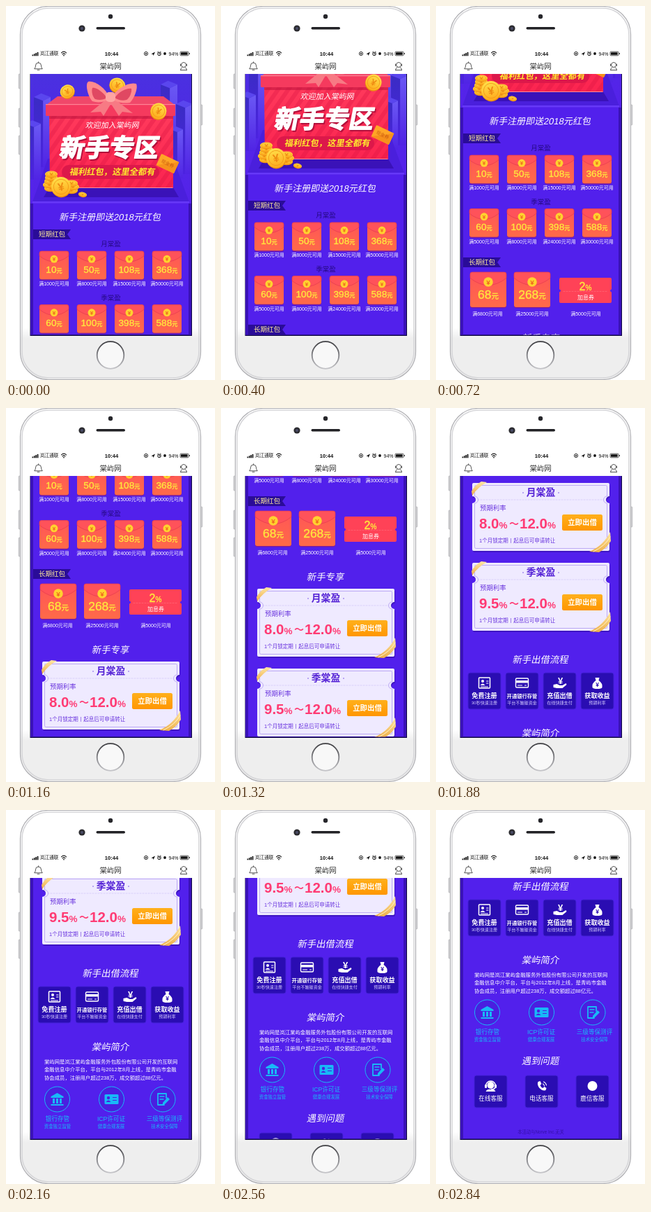
An HTML page for the animation above (3 s loop, 300 px wide and 534 px high).

```html
<!DOCTYPE html>
<html lang="zh">
<head>
<meta charset="utf-8">
<style>
html, body { margin: 0; width: 100%; height: 100%; overflow: hidden; background: #fff; }
svg { display: block; width: 100%; height: 100%; }
text { font-family: "Liberation Sans", "Noto Sans CJK SC", "Noto Sans CJK", sans-serif; }
</style>
</head>
<body>
<svg id="stage" viewBox="0 0 300 534" xmlns="http://www.w3.org/2000/svg"></svg>
<script>
const LOOP = 3000, TICK = 40;
// begin, end, scroll from, scroll to, start slope, end slope
const MOVES = [
  [240, 720, 0, 137, .5, .5],
  [960, 1520, 137, 449, 1, .3],
  [1720, 2320, 449, 680, 1, .15],
  [2520, 2840, 680, 771, .6, .4]
];

const rect = (x, y, w, h, fill, r = 0, more = '') =>
  `<rect x="${x}" y="${y}" width="${w}" height="${h}" rx="${r}" fill="${fill}" ${more}/>`;
const circle = (x, y, r, fill, more = '') =>
  `<circle cx="${x}" cy="${y}" r="${r}" fill="${fill}" ${more}/>`;
const path = (d, fill, more = '') => `<path d="${d}" fill="${fill}" ${more}/>`;
const line = (d, color, w = 1, more = '') =>
  path(d, 'none', `stroke="${color}" stroke-width="${w}" stroke-linecap="round" stroke-linejoin="round" ${more}`);
const at = (x, y, body, more = '') => `<g transform="translate(${x} ${y}) ${more}">${body}</g>`;
// y is the middle of the line of text
const text = (x, y, s, size, fill = '#fff', more = '') =>
  `<text x="${x}" y="${y + size * .36}" font-size="${size}" fill="${fill}" text-anchor="middle" ${more}>${s}</text>`;
const left = (x, y, s, size, fill, more = '') =>
  text(x, y, s, size, fill, more).replace('"middle"', '"start"');
const slant = (x, y, s, size, fill, more = '') => at(x, y, text(0, 0, s, size, fill, more), 'skewX(-11)');
const BOLD = 'font-weight="700"';
const heavy = (color, w) => `font-weight="900" stroke="${color}" stroke-width="${w}" stroke-linejoin="round"`;

const grad = (id, a, b, from = 0, to = 1) =>
  `<linearGradient id="${id}" x2="0" y2="1"><stop offset="${from}" stop-color="${a}"/><stop offset="${to}" stop-color="${b}"/></linearGradient>`;

const defs = `<defs>
  ${grad('sky', '#4a30e0', '#5522ea')}${grad('bright', '#6a58f4', '#5024e4')}${grad('shade', '#3a2cc4', '#4c22e0')}
  ${grad('box', '#ff3a5c', '#fb2450')}${grad('envelope', '#ff5558', '#ff6a48')}${grad('gold', '#ffe04a', '#ffa91c')}
  ${grad('button', '#ffb01c', '#ff9600')}${grad('strip', '#ffe6a4', '#eeb04a')}${grad('shell', '#fff', '#eee', .86, .89)}
  ${grad('ring', '#3c3c40', '#c4c4c8')}
  <pattern id="stripes" width="12" height="12" patternUnits="userSpaceOnUse" patternTransform="rotate(35)">${rect(0, 0, 6, 12, '#d8123f', 0, 'opacity=".3"')}</pattern>
  <clipPath id="view">${rect(35, 97, 231, 372.5, '#000')}</clipPath>
</defs>`;

const yen = (x, y, r, turn = 0, squash = 1) => at(x, y,
  circle(0, 1.4, r, '#e88a10') + circle(0, 0, r, 'url(#gold)') +
  circle(0, 0, r * .76, 'none', 'stroke="#f39a18" stroke-width=".8"') +
  text(0, 0, '¥', r * 1.15, '#ee8a12', BOLD), `rotate(${turn}) scale(1 ${squash})`);

// block seen from a corner: two faces and a flat roof
const tower = (x, y, w, h) => {
  const m = x + w * .55, d = w * .22;
  return path(`M${x} ${y}L${m} ${y + d}V${y + h}H${x}Z`, 'url(#shade)') +
    path(`M${m} ${y + d}L${x + w} ${y}V${y + h}H${m}Z`, 'url(#bright)') +
    path(`M${x} ${y}L${m - d / 2} ${y - d}L${x + w} ${y}L${m} ${y + d}Z`, '#5a46ee');
};

function hero() {
  let s = rect(35, 97, 231, 185, 'url(#sky)');
  s += tower(40, 130, 24, 100) + tower(28, 168, 22, 80) +
    tower(222, 112, 24, 120) + tower(244, 140, 24, 100) + tower(236, 176, 18, 70);
  // platform
  s += path('M60 218H240L263 280H38Z', '#4a1fdc') + path('M64 256H238L248 273H54Z', '#3a12b8') +
    rect(38, 279, 225, 2.5, '#6638f8');
  // box and lid
  s += path('M62 152H240V260H63Z', 'url(#box)') + path('M62 152H240V260H63Z', 'url(#stripes)') +
    rect(62, 156, 178, 5, '#c01440', 0, 'opacity=".6"') +
    path('M74 129H226L242 141H58Z', '#f0486a') + rect(57, 140, 186, 17, '#f53a5e', 1.5) +
    rect(57, 140, 186, 1.2, '#ff8496') + line('M64 259.5H239', '#ff8a98', 1);
  s += yen(88, 122, 10.5, -25, .9) + yen(160, 113, 11.5, 20, .9);
  // bow
  s += path('M148 130L121 152L136 151L140 157L154 134Z', '#f77a84') + path('M152 130L182 153L167 151L162 157L147 134Z', '#f77a84') +
    path('M149 131C142 116 127 106 118 108C113 112 118 130 124 136C133 139 144 137 149 131Z', '#ff8a8e') +
    path('M151 131C159 118 176 108 187 111C190 117 184 132 178 138C167 140 156 137 151 131Z', '#ff8a8e') +
    path('M145 131C137 121 129 116 124 117C122 122 125 131 128 133C134 135 140 134 145 131Z', '#e04862') +
    path('M156 131C163 122 173 117 180 118C181 123 177 132 173 134C167 136 161 134 156 131Z', '#e04862') +
    rect(143, 123, 14, 14, '#ffa5a2', 5);
  s += yen(219, 150, 11.5, 25);
  s += slant(153, 170.5, '欢迎加入棠屿网', 11, '#fff') + rect(80, 227, 140, 20, '#dc184a', 10);
  s += slant(150.5, 204.5, '新手专区', 35.5, '#b3103c', heavy('#b3103c', 1.6)) +
    slant(149, 202, '新手专区', 35.5, '#fff', heavy('#fff', 1.6));
  s += slant(153, 237, '福利红包，这里全都有', 12.3, '#ffe92e', BOLD);
  s += at(232, 225, rect(-14, -9, 28, 18, '#ffa526', 1.5) + path('M-14 9L14 -9V9Z', '#f7901c') +
    text(0, 0, '现金券', 6.5, '#c85a10'), 'rotate(25)');
  // coin pile
  [[64, 260], [62, 255], [64, 250], [65, 245], [65, 240], [94, 263], [96, 258], [94, 253]]
    .forEach(([x, y]) => s += yen(x, y, 9, 0, .5));
  return s + yen(79, 258, 14, -12) + yen(110, 269, 6, 10, .55);
}

const tag = (y, s) => path(`M39 ${y - 7}H93L88 ${y}L93 ${y + 7}H39Z`, '#2a0c98') + left(47, y, s, 9.5, '#ffec9a');

function envelope(cx, y, w, amount, size) {
  const x = cx - w / 2, h = w * .96, f = h * .34;
  return rect(x, y + 1.5, w, h, '#9c1c66', 3.5, 'opacity=".6"') + rect(x, y, w, h, 'url(#envelope)', 3) +
    path(`M${x} ${y + 3}Q${x} ${y} ${x + 3} ${y}H${x + w - 3}Q${x + w} ${y} ${x + w} ${y + 3}V${y + f * .5}Q${cx} ${y + f * 1.7} ${x} ${y + f * .5}Z`,
      '#ff525a', 'stroke="#e23c4e" stroke-width=".7"') +
    circle(cx, y + h * .28, w * .13, '#ffd22e') + text(cx, y + h * .28, '¥', w * .19, '#f0641e', BOLD) +
    text(cx, y + h * .64, `${amount}<tspan font-size="${size * .6}">元</tspan>`, size, '#ffe83c', 'stroke="#ffe83c" stroke-width=".35"');
}

const limit = (x, y, n) => text(x, y, `满${n}元可用`, 7);

function coupons(y, name, items) {
  return text(150.5, y, name, 9.5, '#260a86') + items.map(([amount, min], i) => {
    const x = 69 + i * 54;
    return envelope(x, y + 10, 42, amount, 13.6) + limit(x, y + 56.5, min);
  }).join('');
}

function longTerm() {
  return tag(503, '长期红包') +
    envelope(75, 517, 52, 68, 17.4) + envelope(138, 517, 52, 268, 17.4) +
    limit(74, 576, 6800) + limit(138, 576, 25000) + limit(215, 576, 5000) +
    path('M179 525H250Q252 525 252 527V541.5A2 2 0 0 0 252 545.5V559Q252 561 250 561H179Q177 561 177 559V545.5A2 2 0 0 0 177 541.5V527Q177 525 179 525Z', '#ff4257') +
    line('M183 544.5H246', '#ff7a84', .5, 'stroke-dasharray="2 2"') +
    text(214.5, 537, '2<tspan font-size="10">%</tspan>', 16, '#ffe83c', 'stroke="#ffe83c" stroke-width=".4"') +
    text(215, 553, '加息券', 8);
}

function plan(y, name, low) {
  const edge = (i, r) => {
    const l = 52 + i, t = y + i, rt = 249 - i, b = y + 97 - i, m = y + 24;
    return `M${l + 2} ${t}H${rt - 2}Q${rt} ${t} ${rt} ${t + 2}V${m - r}A${r} ${r} 0 0 0 ${rt} ${m + r}V${b - 2}Q${rt} ${b} ${rt - 2} ${b}H${l + 2}Q${l} ${b} ${l} ${b - 2}V${m + r}A${r} ${r} 0 0 0 ${l} ${m - r}V${t + 2}Q${l} ${t} ${l + 2} ${t}Z`;
  };
  const pct = n => `${n}<tspan font-size="13.5">%</tspan>`;
  const pink = '#ff3b74', violet = '#6a35de';
  return path(edge(0, 5), '#2c0a9c', 'transform="translate(1 2)" opacity=".5"') + path(edge(0, 5), '#efeaff') +
    path(edge(3.5, 5), 'none', 'stroke="#b29cf2" stroke-width=".8"') +
    line(`M60 ${y + 24}H241`, '#cabcf6', .6, 'stroke-dasharray="2 2"') +
    text(150.5, y + 13.5, name, 13.8, '#5523d6', BOLD) +
    circle(125, y + 14, 1, '#a68cf0') + circle(176, y + 14, 1, '#a68cf0') +
    left(63, y + 36, '预期利率', 9.4, violet) +
    left(62, y + 57.5, pct(low), 20.5, pink, BOLD) + text(112, y + 58, '～', 14, pink, BOLD) +
    left(120, y + 57.5, pct('12.0'), 20.5, pink, BOLD) +
    rect(181, y + 45, 58, 23, 'url(#button)', 2.5) + text(210, y + 56.5, '立即出借', 10.4, '#fff', BOLD) +
    left(62, y + 82, '1个月锁定期丨起息后可申请转让', 7.5, violet) +
    path(`M51 ${y + 12}Q56 ${y + 3} 65 ${y - 2}L73 ${y - 1}Q60 ${y + 6} 52 ${y + 18}Z`, 'url(#strip)') +
    path(`M220 ${y + 98}Q240 ${y + 90} 250 ${y + 70}L251 ${y + 83}Q244 ${y + 94} 234 ${y + 99}Z`, 'url(#strip)') +
    line(`M226 ${y + 98}Q243 ${y + 90} 250 ${y + 77}`, '#fff2c8', 1);
}

const heading = (y, s) => slant(150.5, y, s, 13.4, '#fff', 'font-weight="500"');
const tile = (x, y, w, h) => rect(x, y, w, h, '#2a0db2', 3, 'stroke="#4420d8" stroke-width="1"');

const icons = {
  card: rect(-8, -8, 16, 15, 'none', 1, 'stroke="#fff" stroke-width="1.5"') + circle(-2.5, -3, 2, '#fff') +
    path('M-6 3Q-2.5 -2 1 3Z', '#fff') + line('M3 -3H5.5M3 0H5.5M-5 5H5', '#fff', 1.1),
  bank: rect(-9, -7, 18, 13, 'none', 1.5, 'stroke="#fff" stroke-width="1.4"') + rect(-9, -4, 18, 3.5, '#fff') +
    line('M-6 3H0M4 3H6', '#fff', 1.2),
  hand: text(1, -4, '¥', 13, '#fff', BOLD) + path('M-9 2L-4 1L0 3H4L9 0L10 2L4 7H-4L-9 6Z', '#fff'),
  bag: path('M-3 -8H3L2 -4Q8 0 7 6Q6 8 0 8Q-6 8 -7 6Q-8 0 -2 -4Z', '#fff') + text(0, 2, '¥', 8.5, '#2a0db2', BOLD)
};

function steps() {
  const items = [['card', '免费注册', 9.1, '30秒快速注册'], ['bank', '开通银行存管', 7.3, '平台不触碰资金'],
    ['hand', '充值出借', 9.1, '在线快捷支付'], ['bag', '获取收益', 9.1, '预期利率']];
  return heading(880, '新手出借流程') + items.map(([icon, title, size, note], i) => {
    const x = 69.5 + i * 54;
    return tile(x - 23.5, 899, 47, 52) + at(x, 914, icons[icon]) +
      text(x, 932, title, size, '#fff', BOLD) + text(x, 942, note, 6.1, '#d4caff');
  }).join('');
}

function about() {
  const c = '#18b9f7';
  const marks = [
    path('M-9 -4L0 -9L9 -4V-2H-9Z', c) + [-6.5, -1.5, 3.5].map(x => rect(x, -1, 3, 7, c)).join('') + rect(-9, 7, 18, 2, c),
    rect(-10, -7, 20, 14, c, 1.5) + circle(-4.5, -2, 2.2, '#4a1fe0') + path('M-8 4Q-4.5 -1 -1 4Z', '#4a1fe0') +
      line('M2 -2.5H7M2 1.5H7', '#4a1fe0', 1.2),
    line('M5 -2V-8H-7V8H2', c, 1.8) + line('M-4 -4H2M-4 0H1', c, 1.4) + path('M0 5L7 -3L10 0L3 7L0 8Z', c)
  ];
  const items = [[73.5, 74, '银行存管', '资金独立监管'], [151.5, 151, 'ICP许可证', '健康合规发展'],
    [225, 227.5, '三级等保测评', '技术安全保障']];
  const lines = ['棠屿网是岚江棠屿金融服务外包股份有限公司开发的互联网',
    '金融信息中介平台，平台与2012年8月上线，是青屿市金融', '协会成员，注册用户超过238万，成交额超过88亿元。'];
  return heading(985, '棠屿简介') + lines.map((s, i) => left(55, 1006 + i * 11.6, s, 7.37, '#fff')).join('') +
    items.map(([x, tx, title, note], i) => circle(x, 1060, 18, '#4a1fe0', `stroke="${c}" stroke-width="1"`) +
      at(x, 1060, marks[i]) + text(tx, 1088, title, 8.6, c, 'font-weight="500"') + text(tx, 1098.5, note, 6.4, c)).join('');
}

function help() {
  const marks = [
    circle(0, -1, 5, '#fff') + line('M-7 0A7 7 0 0 1 7 0M7 1Q6 5 1 5', '#fff', 1.5) +
      path('M-7 8Q-5 4 0 5Q5 4 7 8Z', '#fff') + rect(-8.5, -2, 3, 5, '#fff', 1) + rect(5.5, -2, 3, 5, '#fff', 1),
    path('M-5 -6L-2 -7L0 -3L-2 -1Q-1 2 2 3L4 1L7 3L6 6Q2 8 -3 3Q-7 -2 -5 -6Z', '#fff') +
      line('M2 -3A4 4 0 0 1 4 0M3 -6A7 7 0 0 1 7 -1', '#fff', 1.1),
    circle(0, 0, 7, '#fff')
  ];
  return heading(1129, '遇到问题') + ['在线客服', '电话客服', '鹿信客服'].map((s, i) => {
    const x = 78.5 + i * 73;
    return tile(x - 23.5, 1150, 47, 46) + at(x, 1165, marks[i]) + text(x, 1183, s, 8.6);
  }).join('') + text(150.5, 1231, '本活动与Norve Inc.无关', 6.3, '#340fa8');
}

function page() {
  return rect(35, 280, 231, 1000, '#5220ec') +
    rect(35, 280, 4, 1000, '#3a12b8') + rect(262, 280, 4, 1000, '#3a12b8') +
    hero() + slant(150, 301.5, '新手注册即送2018元红包', 13, '#fff') + tag(326, '短期红包') +
    coupons(340, '月棠盈', [[10, 1000], [50, 8000], [108, 15000], [368, 50000]]) +
    coupons(416.5, '季棠盈', [[60, 5000], [100, 8000], [398, 24000], [588, 30000]]) +
    longTerm() + heading(611, '新手专享') + plan(628, '月棠盈', '8.0') + plan(742, '季棠盈', '9.5') +
    steps() + about() + help();
}

function phone() {
  const side = (x, y, h) => rect(x, y, 3, h, '#d4d4d6', 1, 'stroke="#a9a9ac" stroke-width=".5"');
  return rect(0, 0, 300, 534, '#fff') + side(18, 97, 21) + side(18, 146, 27) + side(18, 185, 27) + side(279, 141, 29) +
    rect(20.5, .5, 259, 533, 'url(#shell)', 40, 'stroke="#aeaeb2" stroke-width="1.2"') +
    rect(23, 3, 254, 528, 'none', 38, 'stroke="#d6d6d9" stroke-width="1.6"') +
    circle(150, 15, 3.2, '#26262a') + circle(109, 32, 4.6, '#2b2b30') + circle(109, 32, 2, '#4a4c66') +
    rect(129.5, 30, 41.5, 3.6, '#222226', 1.8) +
    circle(150, 498.5, 19.3, '#f8f8f8', 'stroke="url(#ring)" stroke-width="1.8"') +
    rect(35, 61, 231, 36, '#fff') + rect(34.5, 97, 232.5, 374, '#0e0840');
}

function bars() {
  const k = '#111', g = '#444';
  return [0, 1, 2, 3].map(i => rect(37.5 + i * 2.4, 69.5 - i * 1.2, 1.7, 1.8 + i * 1.2, k)).join('') +
    left(49, 68, '岚江通联', 6.6, k) +
    line('M79.5 66.8Q83 63.6 86.5 66.8M81 68.8Q83 67 85 68.8', k, 1.1) + circle(83, 70.6, .9, k) +
    text(151.5, 68, '10:44', 7.6, k, BOLD) +
    circle(201, 68, 2.6, 'none', `stroke="${k}" stroke-width=".9"`) + rect(200, 67.3, 2, 1.7, k) +
    path('M208.5 68.6L214 65.4L211.6 71L211 69Z', k) +
    circle(220, 68.4, 2.3, 'none', `stroke="${k}" stroke-width="1"`) + line('M217.6 65.8L218.6 65M222.4 65.8L221.4 65M220 67.4V68.6H221', k, .8) +
    circle(228, 68, 1.9, k) + left(233.5, 68, '94%', 7, k) +
    rect(250, 65.2, 12, 5.6, 'none', 1.2, `stroke="${k}" stroke-width=".7"`) + rect(251, 66.2, 9.6, 3.6, k, .5) + rect(262.8, 67, 1, 2, k) +
    text(150, 86, '棠屿网', 10.4, '#333') +
    line('M41 89.5Q42.5 88 42.5 85Q42.5 81 46.5 81Q50.5 81 50.5 85Q50.5 88 52 89.5ZM45 91.3H48M46.5 79.8V81', g, .9) +
    line('M251.5 84A3.5 3.5 0 0 1 258.5 84A3.5 3.5 0 0 1 251.5 84M250.5 83V85.5M259.5 83V85.5M250.5 91.5Q250.5 88.5 253 87.5M259.5 91.5Q259.5 88.5 257 87.5M250.5 91.5H259.5', g, .9);
}

const stage = document.getElementById('stage');
stage.innerHTML = defs + phone() + `<g clip-path="url(#view)"><g id="page">${page()}</g></g>` + bars();
const sheet = document.getElementById('page');

const ease = (u, a, b) => a * u * (1 - u) ** 2 + u * u * (3 - 2 * u) - b * u * u * (1 - u);

function scrollAt(time) {
  const t = Math.floor(time / TICK) * TICK;
  let y = 0;
  for (const [begin, end, from, to, a, b] of MOVES)
    if (t > begin) y = from + (to - from) * ease(Math.min(1, (t - begin) / (end - begin)), a, b);
  return Math.round(y);
}

const start = performance.now();
function draw() {
  sheet.setAttribute('transform', `translate(0 ${-scrollAt((performance.now() - start) % LOOP)})`);
  requestAnimationFrame(draw);
}
draw();
</script>
</body>
</html>
```
